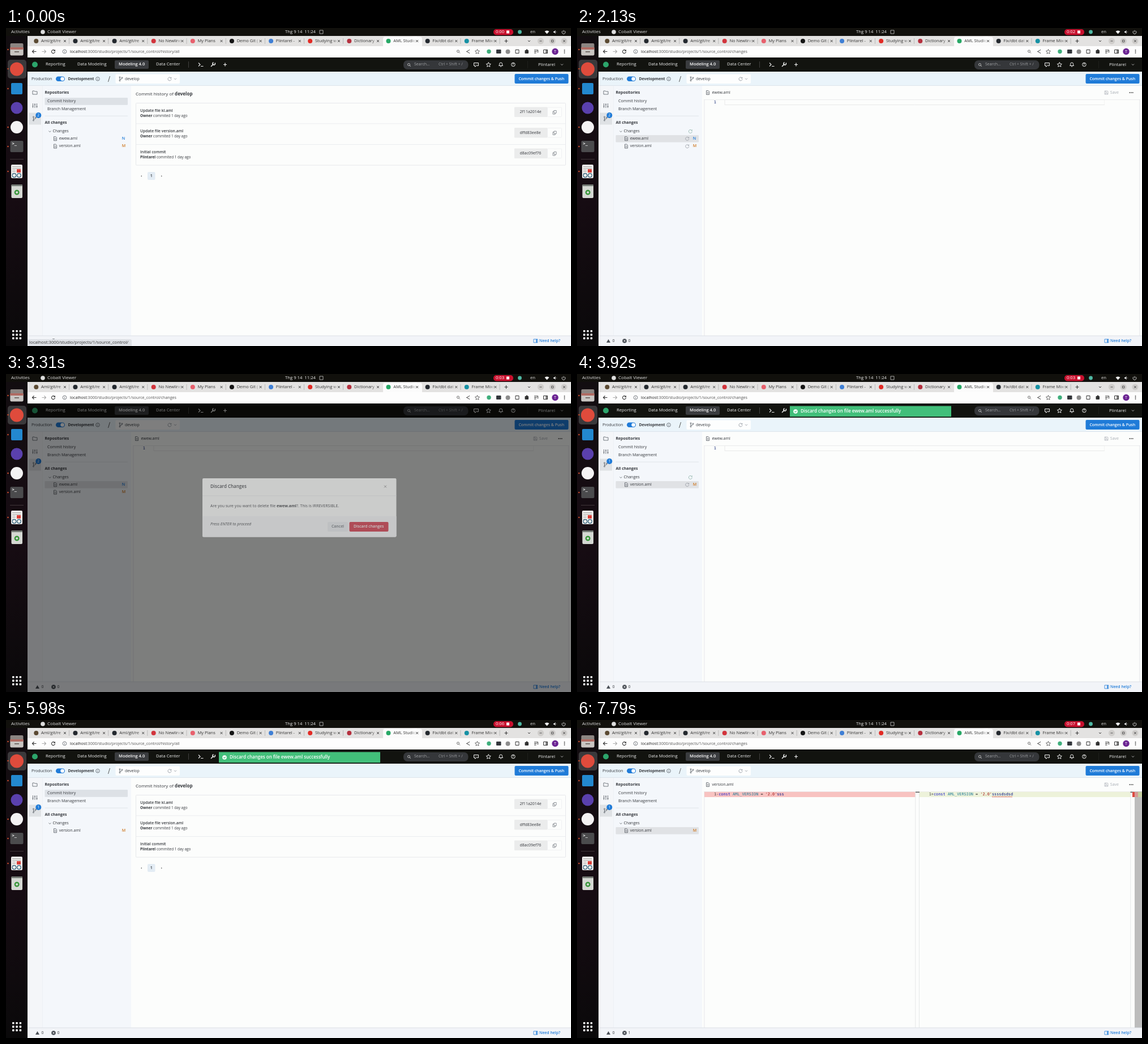
These frames come from a looping animation (998 by 561 pixels, 8000 ms). An HTML page with a canvas:

```html
<!DOCTYPE html>
<html lang="en">
<head>
<meta charset="utf-8">
<title>Discarding changes</title>
<style>
html, body { margin: 0; width: 998px; height: 561px; overflow: hidden; background: #fcfdfc; }
canvas { display: block; }
</style>
</head>
<body>
<canvas id="stage" width="998" height="561"></canvas>
<script>
const LOOP = 8000, BLUE = '#1f7bd8', INK = '#35383d', GREY = '#8a9099';
const screenCtx = document.getElementById('stage').getContext('2d');
const modalLayer = document.createElement('canvas');
modalLayer.width = 998;
modalLayer.height = 561;
let g = screenCtx;

const icons = {
  close: 'M-2-2L2 2M2-2L-2 2',
  plus: 'M-3 0H3M0-3V3',
  minus: 'M-2 0H2',
  square: 'M-1.7-1.7H1.7V1.7H-1.7Z',
  chevron: 'M-2-1L0 1L2-1',
  left: 'M.8-1.5L-.8 0L.8 1.5Z',
  right: 'M-.8-1.5L.8 0L-.8 1.5Z',
  back: 'M3.5 0H-3.5M-.5-3L-3.5 0L-.5 3',
  forward: 'M-3.5 0H3.5M.5-3L3.5 0L.5 3',
  reload: 'M2.3-1.8A3 3 0 1 0 3 .3M3-3V-1.2H1',
  folder: 'M-4-3H-1L0-2H4V3H-4Z',
  sliders: 'M-3.5-4V4M0-4V4M3.5-4V4M-4.7 1H-2.3M-1.2-2H1.2M2.3 1.5H4.7',
  branch: 'M-2-2V2M2-1.2Q2 .8-2 1M-1-3A1 1 0 1 1-3-3A1 1 0 1 1-1-3M-1 3A1 1 0 1 1-3 3A1 1 0 1 1-1 3M3-2A1 1 0 1 1 1-2A1 1 0 1 1 3-2',
  file: 'M-2.5-3.5H1L2.5-2V3.5H-2.5ZM-1.2-.5H1.2M-1.2 1.5H1.2',
  copy: 'M-1-3H3V1.5H-1ZM-1-1.5H-3V3.5H1V1.5',
  search: 'M1 1L3 3M1.5-.5A2 2 0 1 1-2.5-.5A2 2 0 1 1 1.5-.5',
  ring: 'M3.3 0A3.3 3.3 0 1 1-3.3 0A3.3 3.3 0 1 1 3.3 0',
  info: 'M3.3 0A3.3 3.3 0 1 1-3.3 0A3.3 3.3 0 1 1 3.3 0M0-.4V1.8M0-1.9V-1.2',
  star: 'M0-4L1.2-1.3L4-1L2 1L2.5 3.8L0 2.4L-2.5 3.8L-2 1L-4-1L-1.2-1.3Z',
  bell: 'M-3.5 2H3.5L2.5 .5V-1A2.5 2.5 0 0 0-2.5-1V.5ZM-1 3.5H1',
  chat: 'M-4-3H4V2H0L-2 4V2H-4ZM-2-.5H-1M1-.5H2',
  share: 'M-2.5 0L2.5-2.6M-2.5 0L2.5 2.6M2-3H3M2 3H3M-3 0H-2',
  prompt: 'M-4-3L-1 0L-4 3M0 3H4.5',
  wrench: 'M-3.5 3.5L1 -1M3.5-3A2.3 2.3 0 1 1 1-3.8',
  box: 'M-3-3H3V3H-3Z',
  save: 'M-3-3H2L3-2V3H-3ZM-1.5-3V-1H1.5M-1.5 3V.8H1.5V3',
  warn: 'M0-3L3.5 3H-3.5Z',
  list: 'M-3.5-2.5H3.5M-3.5 0H1M-3.5 2.5H0M3-2.5V2',
  panel: 'M-3.5-3H3.5V3H-3.5ZM1-3V3M2-3V3',
  check: 'M-1.7 0L-.4 1.3L1.8-1.2',
  power: 'M0-3.5V0M-1.8-2.3A3 3 0 1 0 1.8-2.3',
  speaker: 'M-3-1H-1.5L.5-3V3L-1.5 1H-3ZM2-1.5Q3 0 2 1.5'
};
for (const k in icons) icons[k] = new Path2D(icons[k]);

function rect(x, y, w, h, color, r = 0) {
  g.fillStyle = color;
  g.beginPath();
  g.roundRect(x, y, w, h, r);
  g.fill();
}
function frame(x, y, w, h, color, r = 0) {
  g.strokeStyle = color;
  g.lineWidth = 1;
  g.beginPath();
  g.roundRect(x, y, w, h, r);
  g.stroke();
}
function dot(x, y, r, color) {
  rect(x - r, y - r, 2 * r, 2 * r, color, r);
}
// Draws one run of text centred on y and returns the x where it ends.
function text(s, x, y, size = 7, color = INK, weight = 400, family = '"Open Sans", sans-serif') {
  g.font = `${weight} ${size}px ${family}`;
  g.textBaseline = 'middle';
  g.fillStyle = color;
  g.fillText(s, x, y);
  return x + g.measureText(s).width;
}
function icon(name, x, y, color = '#555b63', filled = false, width = .8) {
  g.save();
  g.translate(x, y);
  g.lineWidth = width;
  g.strokeStyle = g.fillStyle = color;
  filled ? g.fill(icons[name]) : g.stroke(icons[name]);
  g.restore();
}
const ramp = (t, a, b) => Math.max(0, Math.min(1, (t - a) / (b - a)));

function systemBar(t) {
  rect(0, 0, 998, 14, '#11100c');
  text('Activities', 9, 7, 8, '#ddd');
  dot(65, 7, 3.8, '#ddd');
  text('Cobalt Viewer', 73, 7, 8, '#ddd');
  text('Thg 9 14  11:24', 493, 7, 7.7, '#eee');
  icon('box', 557, 7, '#ccc');
  rect(861, 2, 35, 10.5, '#c8102e', 5);
  text('0:0' + Math.floor((t + 70) / 1000), 865, 7.2, 7.6, '#fff');
  rect(884, 4.5, 5, 5, '#fff');
  dot(907.5, 7, 3.4, '#4fb9a4');
  text('en', 926, 7, 7.7, '#ddd');
  g.fillStyle = '#eee';
  g.beginPath();
  g.moveTo(955.5, 10.5);
  g.arc(955.5, 10.5, 6, -2.3, -.84);
  g.fill();
  icon('speaker', 970, 7, '#eee', true);
  icon('power', 985, 7.3, '#eee');
}

function dock() {
  const shade = g.createLinearGradient(0, 14, 0, 561);
  shade.addColorStop(0, '#120d10');
  shade.addColorStop(.5, '#170c13');
  shade.addColorStop(1, '#0a090a');
  rect(0, 14, 38.5, 547, shade);
  rect(3, 56, 33, 33, '#3b393b', 5);
  rect(7.5, 27, 23, 21, '#8c8582', 2);
  rect(7.5, 34, 23, 14.5, '#c9c5c2', 2);
  rect(7.5, 34, 23, 4, '#b06a62');
  rect(15, 41, 8, 2, '#77716e');
  dot(19, 72.5, 12, '#df4b3c');
  rect(9, 97, 20, 20, '#2388cf', 2);
  dot(19, 141, 10.5, '#5a40ad');
  dot(19, 175, 11, '#f4f2f3');
  rect(7.5, 199, 23, 20, '#4b4b4d', 2);
  text('>_', 10.5, 204.5, 7, '#fff', 700, '"DejaVu Sans Mono", monospace');
  rect(7, 231, 24, .7, '#54484d');
  rect(9, 241, 20, 24, '#f0eeec', 2);
  rect(19, 249, 7, 6, '#d9403a');
  for (let i = 0; i < 5; i++) rect(11, 244 + i * 3, i < 2 ? 15 : 6, .8, '#999');
  icon('ring', 14.5, 260, '#30627d', false, 1.2);
  icon('ring', 23, 260, '#30627d', false, 1.2);
  rect(9.5, 276, 19.5, 24, '#d5d8d3', 2);
  rect(9.5, 276, 19.5, 3, '#777d77', 1);
  icon('ring', 19.2, 290, '#38963a', false, 2.4);
  for (const y of [38, 72, 107, 175, 209, 253]) dot(3.5, y, 1.2, '#d9532f');
  for (let i = 0; i < 9; i++) rect(11 + i % 3 * 6.3, 533 + Math.floor(i / 3) * 6.3, 3.6, 3.6, '#f2f2f2', 1);
}

const tabs = [
  ['Aml/git/re', '#5b4a32'], ['Aml/git/re', '#24292f'], ['Aml/git/re', '#24292f'], ['No Newline', '#d2343c'],
  ['My Plans', '#e8606d'], ['Demo Git (', '#151515'], ['Plintarel -', '#3f7fd5'], ['Studying w', '#e22b25'],
  ['Dictionary', '#b5303e'], ['AML Studio', '#27a866'], ['Fix/dbt dat', '#24292f'], ['Frame Mixer', '#1691a4']
];
function browser(url) {
  const strip = '#e3e2e1', active = '#fbfbfb';
  rect(38, 14, 960, 18, strip);
  rect(666, 15.5, 69, 17, active, [4, 4, 0, 0]);
  tabs.forEach(([title, color], i) => {
    const x = 62 + i * 69.13, bg = i == 9 ? active : strip;
    dot(x - 8.7, 23, 4, color);
    g.save();
    g.beginPath();
    g.rect(x, 15, 41.5, 16);
    g.clip();
    text(title, x, 22.8, 7.5, '#333');
    const fade = g.createLinearGradient(x + 31, 0, x + 41, 0);
    fade.addColorStop(0, bg + '00');
    fade.addColorStop(1, bg);
    rect(x + 31, 15, 12, 16, fade);
    g.restore();
    icon('close', x + 42, 23, '#333', false, .9);
    if (i != 8 && i != 9) rect(x + 49.3, 18, .7, 10, '#a9a9a9');
  });
  icon('plus', 883.5, 23, '#333', false, 1);
  icon('chevron', 924, 23, '#333', false, 1);
  ['minus', 'square', 'close'].forEach((name, i) => {
    dot(944.5 + i * 20.7, 23, 5.6, '#cfcdcb');
    icon(name, 944.5 + i * 20.7, 23, '#333');
  });

  rect(38, 32, 960, 20, '#fdfdfd');
  icon('back', 50, 41.5, '#333', false, 1.1);
  icon('forward', 67, 41.5, '#aaa', false, 1.1);
  icon('reload', 83.5, 41.5, '#333', false, 1.1);
  icon('info', 103.5, 41.5);
  const end = text('localhost', 113, 41.7, 7.1, '#222');
  text(':3000/studio/projects/1/' + url, end, 41.7, 7.1, '#555');
  icon('search', 799, 41.5, '#444');
  icon('share', 816, 41.5, '#444', false, 1);
  icon('star', 832.5, 41.5, '#444');
  dot(853, 41.5, 3.7, '#3fae7c');
  rect(866, 38, 8.5, 7, '#33363b', 1);
  dot(886.5, 41.8, 4, '#8c8c8c');
  icon('box', 903, 41.5, '#333', false, 1);
  rect(916.5, 39, 6.5, 6, '#333', 1);
  dot(920, 38.8, 1.4, '#333');
  icon('list', 936.5, 41.5, '#333', false, 1);
  icon('panel', 953, 41.5, '#333', false, 1);
  dot(970, 41.5, 5.7, '#6b2392');
  text('T', 968, 41.7, 7, '#fff');
  for (let i = -1; i < 2; i++) dot(986.5, 41.5 + i * 2.6, .9, '#444');
}

function appHeader() {
  rect(38, 52, 960, 25, '#12130f');
  dot(51, 64.5, 5, '#2ca56b');
  rect(192, 57, 60, 15, '#3a3c3f', 2);
  text('Reporting', 70, 64.5, 7.6, '#eee', 500);
  text('Data Modeling', 126, 64.5, 7.6, '#eee', 500);
  text('Modeling 4.0', 199, 64.5, 7.5, '#fff', 600);
  text('Data Center', 265, 64.5, 7.6, '#eee', 500);
  rect(322, 59, .7, 11, '#555');
  icon('prompt', 344, 64.5, '#eee', false, 1.1);
  icon('wrench', 365.5, 64.5, '#eee', false, 1.5);
  icon('plus', 387, 64.5, '#eee', false, 1.2);
  rect(702, 57, 114.5, 16, '#35373a', 7);
  icon('search', 712, 65, '#bbb', false, 1);
  text('Search...', 721, 64.5, 7, '#a2a4a7');
  text('Ctrl + Shift + /', 764, 64.5, 6.8, '#96989b');
  ['chat', 'star', 'bell', 'ring'].forEach((name, i) => icon(name, 830.5 + i * 21.8, 64.5, '#eee', false, 1));
  text('?', 894.2, 64.7, 6, '#eee', 700);
  rect(921, 58, .6, 13, '#292a28');
  text('Plintarel', 940, 64.5, 7.8, '#eee');
  icon('chevron', 982, 64.5, '#ddd');
}

function toolbar() {
  rect(38, 77, 960, 25, '#eaf4fa');
  rect(38, 101, 960, .7, '#d8dfe6');
  text('Production', 45, 89.8, 7.1);
  rect(88, 85.5, 16, 8.5, BLUE, 4.3);
  dot(99.6, 89.7, 3.3, '#fff');
  text('Development', 109.5, 89.8, 6.9, INK, 700);
  icon('info', 162, 89.8);
  g.strokeStyle = '#555';
  g.beginPath();
  g.moveTo(180.5, 95);
  g.lineTo(183.5, 85);
  g.stroke();
  rect(193.5, 81.5, 113.5, 16.5, '#fdfefe', 2);
  icon('branch', 203, 89.8);
  text('develop', 210, 89.8, 7);
  icon('reload', 289, 89.8, GREY);
  icon('chevron', 299, 89.8, GREY);
  rect(898.5, 81, 95, 17, BLUE, 2);
  text('Commit changes & Push', 905.5, 89.8, 6.9, '#fff', 600);
}

function iconStrip(page, count, gitLit) {
  rect(38, 102, 26, 441, '#f4f6f9');
  if (page == 'explore') rect(40.5, 103.5, 21.5, 21, '#dfe4e8');
  if (gitLit) rect(40.5, 149.5, 21.5, 21, '#dfe2e5');
  icon('folder', 51, 114);
  icon('sliders', 51, 137);
  icon('branch', 50.5, 160);
  dot(57.3, 154, 5, BLUE);
  text(count, 55.3, 154, 6.6, '#fff');
  rect(64, 102, .7, 441, '#dde1e7');
}

function sourcePanel(page, files, hover, lit) {
  if (page == 'history') rect(68.5, 123, 146.5, 12.8, '#dde1e6', 1);
  text('Repositories', 68.5, 114, 6.9, INK, 700);
  text('Commit history', 73, 129.5, 7);
  text('Branch Management', 73, 143, 7);
  rect(68.5, 154.7, 146.5, .7, '#d9dde3');
  text('All changes', 68.5, 167, 6.9, INK, 700);
  icon('chevron', 77.5, 182.5);
  text('Changes', 82.5, 182, 7);
  if (hover) icon('reload', 200.3, 182.3, '#7da79b', false, .7);
  files.forEach(([name, mark], i) => {
    const y = 195.2 + i * 13.4;
    if (!i && lit) rect(68.5, y - 6.2, 146.5, 12.6, '#e0e2e5', 1);
    icon('file', 87, y);
    text(name, 93.7, y, 7);
    if (hover) icon('reload', 194.7, y, GREY, false, .7);
    text(mark, 204.7, y, 7, mark == 'N' ? BLUE : '#cf7b26', 600);
  });
}

function explorePanel() {
  rect(69.5, 107, 113, 17.5, '#fdfefe', 2);
  frame(69.5, 107.5, 113, 17, '#e3e6ea', 2);
  icon('search', 79, 115.8);
  text('Search files', 85, 115.8, 6.9, GREY);
  icon('reload', 191, 116);
  icon('plus', 207, 116);
  text('AML', 72, 135, 7, INK, 700);
  icon('chevron', 208, 135.5);
  ['README.md', 'kl.aml', 'version.aml'].forEach((name, i) => {
    const y = 149 + i * 13.6;
    icon('file', 90, y);
    text(name, 97.3, y, 7);
  });
  text('M', 206.5, 176.2, 7, '#cf7b26', 600);
}

function history() {
  const end = text('Commit history of ', 229, 116.7, 8);
  text('develop', end, 116.7, 8, INK, 700);
  frame(229.5, 132.5, 759, 109.5, '#e6e8eb', 1);
  [['Update file kl.aml', 'Owner', '2f11a2014e'],
   ['Update file version.aml', 'Owner', 'dffd83ee8e'],
   ['Initial commit', 'Plintarel', 'd8ac09ef76']].forEach(([title, who, hash], i) => {
    const y = 146 + i * 36.5;
    if (i) rect(229.5, y - 14, 759, .8, '#e6e8eb');
    text(title, 237, y, 6.8, INK, 600);
    text(' commited 1 day ago', text(who, 237, y + 9.3, 6.4, INK, 700), y + 9.3, 6.4);
    rect(898, y - 6.5, 58.5, 17.5, '#ebecec', 1);
    text(hash, 907.5, y + 2.3, 7);
    frame(956.5, y - 6, 25, 16.5, '#f0f1f2', 1);
    icon('copy', 969, y + 2.5, '#777d85');
  });
  rect(250, 254, 13.5, 14, '#e3ecf4', 2);
  text('1', 254.8, 261.2, 7, INK, 600);
  icon('left', 239, 261.2, '#666', true);
  icon('right', 275, 261.2, '#666', true);
}

function code(s, x, y, color) {
  return text(s, x, y, 6.85, color, 400, '"DejaVu Sans Mono", monospace');
}
function fileHeader(name) {
  icon('file', 231, 114);
  text(name, 238.5, 114, 7);
  icon('save', 935, 114, '#b4b8be');
  text('Save', 941.8, 114, 7, '#a9aeb5');
  for (let i = -1; i < 2; i++) dot(979 + i * 2.7, 114, .9, '#444');
  rect(224.5, 126, 770, .7, '#e4e6e8');
  rect(224.5, 126, .8, 417, '#dfe2e5');
}
function editor() {
  fileHeader('ewew.aml');
  frame(261, 126.5, 671, 9, '#e9eaea');
  rect(932, 127, 2, 9, '#fcfdfc');
  code('1', 241.7, 131.2, '#0b216f');
  rect(993.5, 126, .8, 417, '#dfe2e5');
}
function codeLine(lead, x, tail) {
  let end = code(lead, x, 131.2, '#444');
  end = code('const ', end, 131.2, '#1414c8');
  end = code('AML_VERSION', end, 131.2, '#267f99');
  end = code(' = ', end, 131.2, '#222');
  end = code("'2.0'", end, 131.2, '#a31515');
  return [end, code(tail, end, 131.2, '#001080')];
}
function diff() {
  fileHeader('version.aml');
  rect(225, 126.7, 372.5, 9.3, '#f8c3c1');
  rect(604.5, 126.7, 373, 9.3, '#edf2da');
  for (const x of [597.5, 604, 977.5]) rect(x, 126, .7, 417, '#dcdee0');
  rect(598, 126.7, 7, 1.2, '#333');
  rect(977.5, 126.7, 7, 1.2, '#333');
  codeLine('1-', 242, 'sss');
  const [from, to] = codeLine('1+', 621.7, 'ssssdsdsd');
  g.strokeStyle = '#d33a30';
  g.lineWidth = .8;
  g.beginPath();
  for (let x = from, i = 0; x <= to; x += 1.2, i++) g.lineTo(x, 135 + i % 2);
  g.stroke();
  rect(985, 126, 13, 417, '#bcbcbc');
  rect(981, 127, 4, 9, '#dc4a42');
  rect(985, 127, 6, 9, '#d69a97');
  rect(991, 127, 7, 9, '#c5cfa0');
}

function statusBar(errors, bubble) {
  rect(38, 543, 960, 18, '#f2f4f8');
  rect(38, 542.6, 960, .8, '#dde1e7');
  icon('warn', 55.5, 552, '#4b5057', true);
  text('0', 62.5, 552, 7);
  dot(84, 552, 3.8, '#4b5057');
  g.save();
  g.translate(84, 552);
  g.scale(.7, .7);
  icon('close', 0, 0, '#fff', false, 1.2);
  g.restore();
  text(errors, 90.5, 552, 7);
  icon('panel', 935.5, 552, BLUE);
  text('Need help?', 942, 552, 6.9, BLUE, 600);
  if (bubble) {
    rect(38, 549, 184, 12, '#dee1e6', [0, 3, 0, 0]);
    text('localhost:3000/studio/projects/1/source_control/', 41, 555.2, 7.74, '#333');
  }
}

function drawModal() {
  g = modalLayer.getContext('2d');
  rect(347, 184, 342.5, 103.5, '#fff', 2);
  rect(347, 214.5, 342.5, .8, '#e4e6e9');
  rect(347, 251, 342.5, 36.5, '#f6f7f9', [0, 0, 2, 2]);
  text('Discard Changes', 361, 199, 8, INK, 600);
  icon('close', 670, 198.5, '#777');
  let end = text('Are you sure you want to delete file ', 361, 233, 7);
  end = text('ewew.aml', end, 233, 7, INK, 700);
  text('?. This is IRREVERSIBLE.', end, 233, 7);
  text('Press ENTER to proceed', 361, 265.2, 7, INK, 'italic 400');
  rect(568, 261, 36, 17, '#eaecef', 2);
  text('Cancel', 575, 269.3, 6.9, '#60666e', 600);
  rect(606.5, 261, 69, 17, '#d02c3f', 2);
  text('Discard changes', 614, 269.3, 6.8, '#fff', 600);
  g = screenCtx;
}

function toast(alpha) {
  if (!alpha) return;
  g.save();
  g.globalAlpha = alpha;
  g.translate(0, (alpha - 1) * 12);
  rect(376, 56.5, 285, 18.7, '#42bf7a');
  dot(386, 66, 3.8, '#fff');
  icon('check', 386, 66, '#42bf7a', false, 1.1);
  text('Discard changes on file ewew.aml successfully', 395, 66, 8, '#fff', 600);
  g.restore();
}

function draw(t) {
  const within = (a, b) => t >= a && t < b;
  const page = t < 840 ? 'history' : t < 4440 ? 'editor' : t < 5200 ? 'explore' : t < 7250 ? 'history' : 'diff';
  const url = { history: 'source_control/history/all', explore: 'explore/' }[page] || 'source_control/changes';
  const discarded = t >= 3720;
  const files = [['ewew.aml', 'N'], ['version.aml', 'M']].slice(discarded ? 1 : 0);
  const hover = within(640, 2240) || within(3680, 4300) || within(6270, 7550);

  rect(0, 0, 998, 561, '#fcfdfc');
  systemBar(t);
  dock();
  browser(url);
  appHeader();
  toolbar();
  iconStrip(page, files.length, page != 'explore' || t > 4750);
  rect(64.5, 102, 156.5, 441, '#f4f7fb');
  if (page == 'explore') explorePanel();
  else sourcePanel(page, files, hover, hover || page != 'history');
  if (page == 'history') history();
  if (page == 'editor') editor();
  if (page == 'diff') diff();
  statusBar(t > 7600 ? 1 : 0, t < 300 || within(4800, 5220));

  const mask = ramp(t, 2240, 2430) - ramp(t, 3450, 3680);
  rect(38, 52, 960, 509, `rgba(0,0,0,${mask / 2})`);
  g.globalAlpha = ramp(t, 2430, 2640) - ramp(t, 3220, 3450);
  g.drawImage(modalLayer, 0, 0);
  g.globalAlpha = 1;
  toast(ramp(t, 3720, 3870) - ramp(t, 7300, 7450));
}

drawModal();
function tick() {
  draw(performance.now() % LOOP);
  requestAnimationFrame(tick);
}
tick();
</script>
</body>
</html>
```
